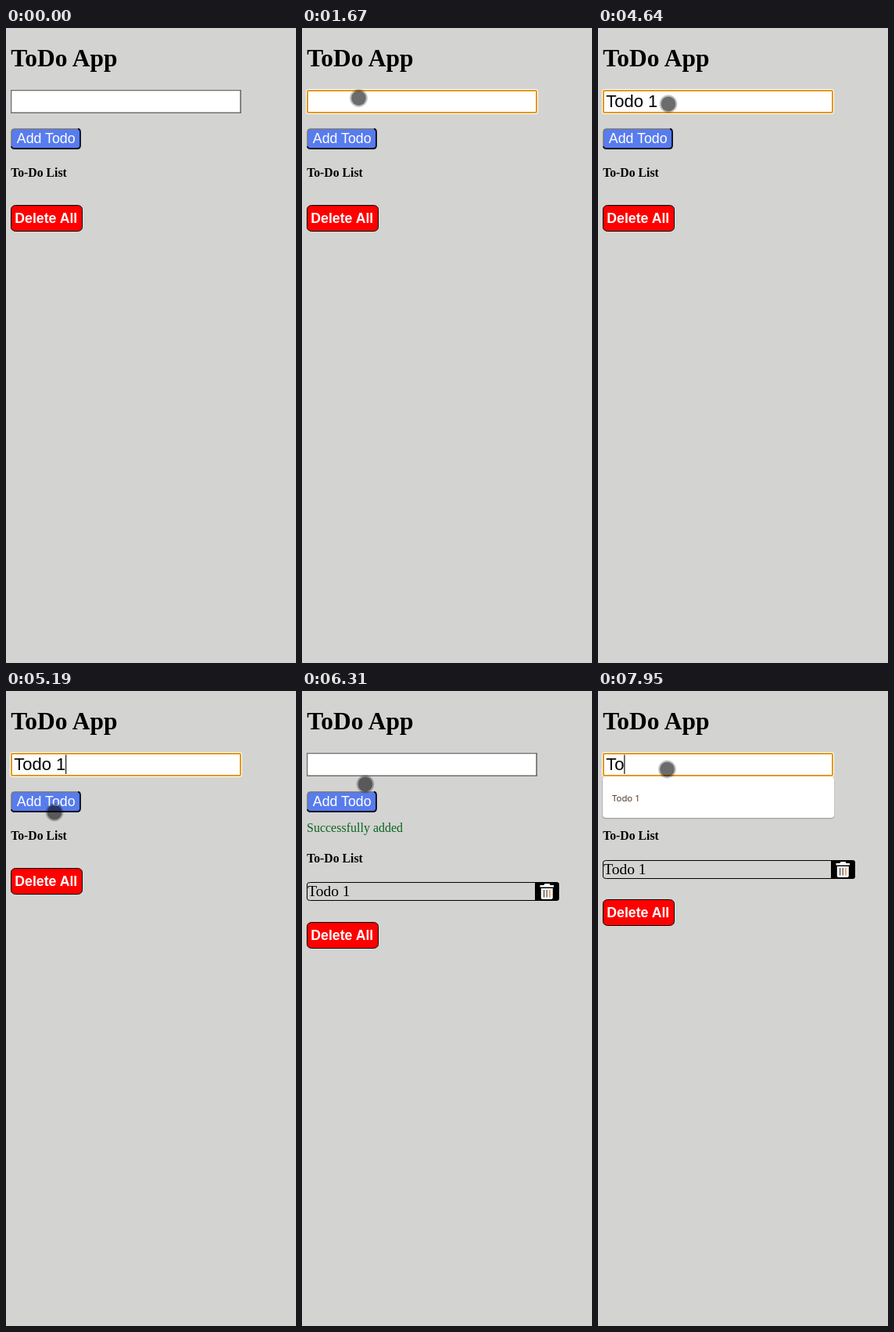
Write an HTML page that moves like this. It is 371x811 px and loops after 8 s.

```html
<!DOCTYPE html>
<html lang="en">
<head>
<meta charset="utf-8">
<title>ToDo App</title>
<style>
  html, body { margin: 0; width: 100%; height: 100%; overflow: hidden; background: #d3d3d1; }
  svg { display: block; width: 371px; height: 811px; }
  text { white-space: pre; }
  .serif { font-family: "Liberation Serif", "Times New Roman", serif; }
  .sans { font-family: "Liberation Sans", Arial, sans-serif; }
  .ui { font-family: "Open Sans", "Noto Sans", sans-serif; }
  .bold { font-weight: bold; }
</style>
</head>
<body>
<svg viewBox="0 0 371 811">
  <text class="serif bold" x="6.2" y="49" font-size="31.5">ToDo App</text>

  <g id="idle">
    <rect x="6" y="79" width="295" height="30" fill="#6f6f6f"/>
    <rect x="7.3" y="80.3" width="292" height="27.2" fill="#fff"/>
  </g>
  <g id="focus">
    <rect x="5" y="78" width="297" height="32" rx="3.5" fill="#fff"/>
    <rect x="7" y="80" width="293" height="28" rx="1.5" fill="#fff" stroke="#e39a0c" stroke-width="2"/>
  </g>
  <text id="typed" class="sans" x="10.3" y="101" font-size="22"></text>
  <rect id="caret" y="81.5" width="1.1" height="24.5"/>

  <rect x="7" y="129" width="88" height="25" rx="4" fill="#587cee"/>
  <path id="edgeA" d="M7 151V133Q7 129 11 129H92" fill="none"/>
  <path id="edgeB" d="M92 129Q95 129 95 133V150Q95 154 91 154H11Q7 154 7 151" fill="none"/>
  <text class="sans" x="13.8" y="147" font-size="17.8" fill="#fff">Add Todo</text>

  <text id="msg" class="serif" x="6" y="180" font-size="16" fill="#0d6420">Successfully added</text>
  <text id="title" class="serif bold" x="6.2" y="190" font-size="15.75">To-Do List</text>

  <g id="item">
    <rect x="6.5" y="216.5" width="322" height="23" rx="4" ry="2.5" fill="none" stroke="#000"/>
    <path id="bin" d="M0 216H25Q329 216 329 219V237Q329 240 325 240H0Z"/>
    <text class="serif" x="7.2" y="234" font-size="19.5">Todo 1</text>
    <g id="trash">
      <path fill="#fff" d="M304.5 220H309.5L310.5 218H316.5L317.5 220H322V222.6H304.5ZM305.8 224H320.8V236Q320.8 238 318.8 238H307.8Q305.8 238 305.8 236Z"/>
      <g fill="none" stroke-width="1.3">
        <path d="M309.6 226V235.5" stroke="#444"/>
        <path d="M313.3 226V235.5" stroke="#6a5038"/>
        <path d="M317 226V235.5" stroke="#cf7f38"/>
      </g>
    </g>
  </g>

  <g id="clear">
    <rect x="6.5" y="226.5" width="91" height="33" rx="6" ry="5" fill="#fe0000" stroke="#000"/>
    <text class="sans bold" x="11.3" y="249" font-size="17.7" fill="#fff">Delete All</text>
  </g>

  <g id="drop">
    <rect x="5.5" y="111.5" width="297" height="52" rx="4" fill="#000" opacity=".1"/>
    <rect x="5.5" y="111" width="296.5" height="51.8" rx="4" fill="#000" opacity=".2"/>
    <rect x="6" y="110" width="296" height="52" rx="4" fill="#fff"/>
    <text class="ui" x="18" y="141" font-size="11.4" fill="#4a2b14">Todo 1</text>
  </g>

  <g id="pointer">
    <circle r="11.4" opacity=".24"/>
    <circle r="9.4" fill="#8e8e8e" style="mix-blend-mode:multiply"/>
  </g>
</svg>
<script>
const LOOP = 8000;
const $ = id => document.getElementById(id);

// Each step patches the state from its time on.
const steps = [
  [0, { text: "", focus: false, caret: false, press: false, msg: false, item: false, trash: false, drop: false }],
  [1140, { focus: true, caret: true }],
  [1670, { caret: false }],
  [2130, { caret: true }],
  [2200, { text: "T" }],
  [2390, { text: "To" }],
  [2650, { text: "Tod" }],
  [2790, { text: "Todo" }],
  [3130, { text: "Todo " }],
  [3660, { caret: false }],
  [4120, { text: "Todo 1", caret: true }],
  [4640, { caret: false }],
  [5170, { caret: true }],
  [5510, { focus: false, caret: false, press: true }],
  [5570, { text: "", msg: true, item: true }],
  [5640, { press: false }],
  [5840, { trash: true }],
  [6570, { msg: false }],
  [6640, { focus: true, caret: true }],
  [6700, { drop: true }],
  [7180, { caret: false }],
  [7640, { text: "T", caret: true }],
  [7950, { text: "To" }]
];

// Pointer strokes: start time, time per point, points.
const strokes = [
  [190, 68, [[333, 695], [312, 482], [248, 281], [183, 167], [130, 82], [100, 46],
             [84, 33], [75, 45], [71, 65], [71, 82], [72.5, 89.5]]],
  [4380, 70, [[81, 93], [90, 97]]],
  [4640, 74, [[90, 97], [92, 100], [94, 106], [93, 114], [88, 124], [80, 135],
              [70, 147], [62, 155], [59, 155], [60, 151], [62, 148]]],
  [6100, 67, [[64, 145], [69, 138], [75, 129], [81, 119], [85, 110], [87, 104], [88.5, 100]]]
];

const pen = document.createElement("canvas").getContext("2d");
pen.font = '22px "Liberation Sans", Arial, sans-serif';

const show = (id, on) => $(id).setAttribute("visibility", on ? "visible" : "hidden");
const move = (id, x, y) => $(id).setAttribute("transform", `translate(${x} ${y})`);

function stateAt(t) {
  return Object.assign({}, ...steps.filter(s => s[0] <= t).map(s => s[1]));
}

function pointerAt(t) {
  const stroke = strokes.filter(s => s[0] <= t).pop();
  if (!stroke) return null;
  const [start, gap, points] = stroke;
  return points[Math.min(points.length - 1, Math.floor((t - start) / gap))];
}

function edge(id, dark) {
  $(id).setAttribute("stroke", dark ? "#0b0f22" : "#74767c");
  $(id).setAttribute("stroke-width", dark ? 1.9 : 1.5);
}

function draw(t) {
  const s = stateAt(t);
  $("typed").textContent = s.text;
  $("caret").setAttribute("x", 10.1 + pen.measureText(s.text).width);
  show("idle", !s.focus);
  for (const id of ["focus", "caret", "msg", "item", "trash", "drop"]) show(id, s[id]);

  edge("edgeA", s.press);
  edge("edgeB", !s.press);

  const drop = s.msg ? 29 : 0;
  move("title", 0, drop);
  move("item", 0, s.msg ? 28 : 0);
  move("clear", 0, drop + (s.item ? 40 : 0));
  const left = s.trash ? 298 : 300;
  $("bin").setAttribute("d", `M${left} 216H325Q329 216 329 219V237Q329 240 325 240H${left}Z`);

  const p = pointerAt(t);
  show("pointer", p);
  if (p) move("pointer", ...p);
}

const begin = performance.now();
function tick() {
  draw((performance.now() - begin) % LOOP);
  requestAnimationFrame(tick);
}
tick();
</script>
</body>
</html>
```
